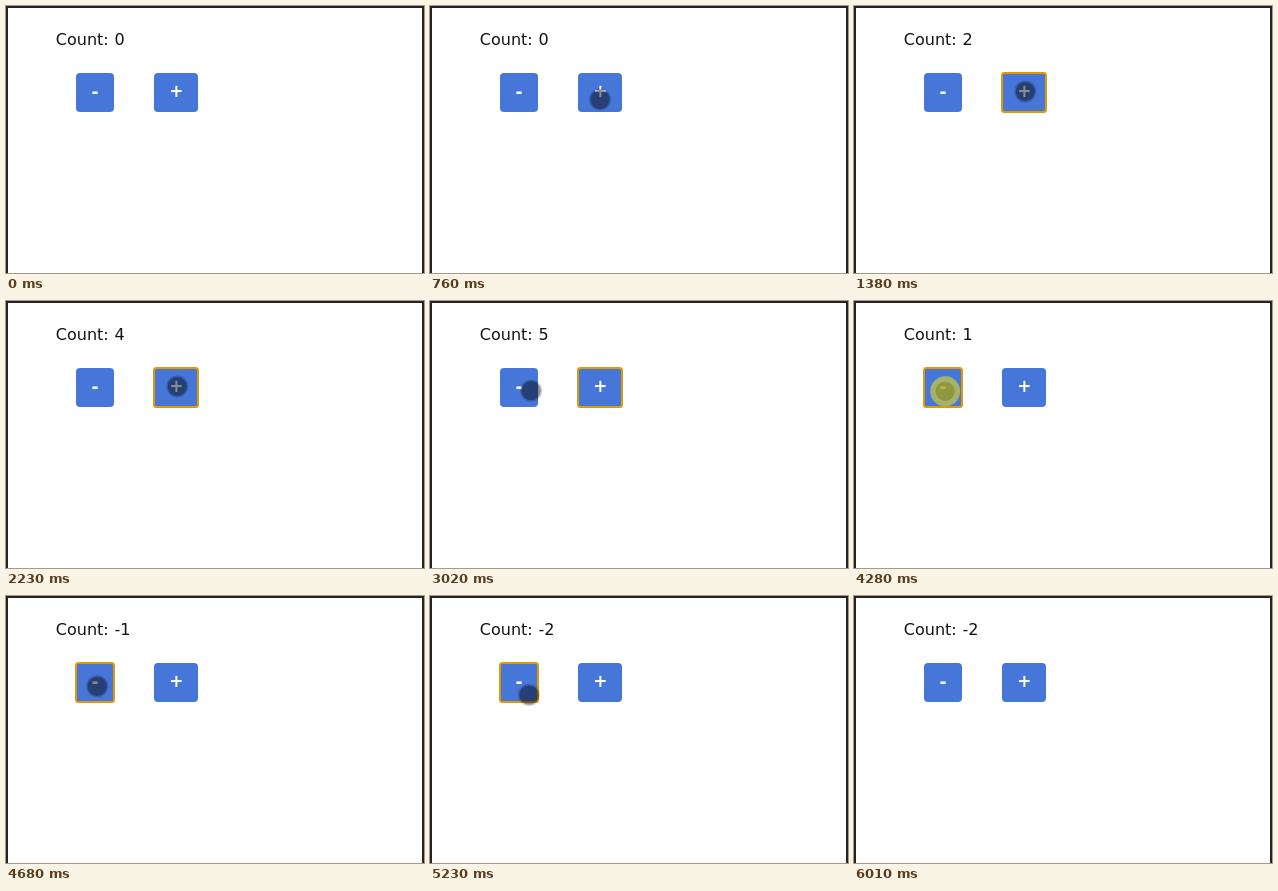
Recreate the animation shown at these times as an HTML page. Size 418x267 px, loop 6.09 s.

```html
<!DOCTYPE html>
<html lang="en">
<head>
<meta charset="utf-8">
<title>Counter</title>
<style>
  html, body { margin: 0; width: 100%; height: 100%; overflow: hidden; background: #fff; }
  svg { display: block; width: 418px; height: 267px; }
  text { font: 16px "DejaVu Sans", Verdana, sans-serif; fill: #111318; }
  .button rect { fill: #4676d8; rx: 4px; }
  .button text { font-size: 17px; font-weight: bold; fill: #fff; text-anchor: middle; }
  .focused rect { stroke: #e59700; stroke-width: 2; rx: 2.5px; }
</style>
</head>
<body>
<svg viewBox="0 0 418 267">
  <path d="M1 267V1H417V267" fill="none" stroke="#242424" stroke-width="2"/>
  <text x="49.8" y="39">Count:</text>
  <text id="count" x="108.6" y="39">0</text>
  <g id="minus" class="button">
    <rect x="70" y="67" width="38" height="39"/>
    <text x="89" y="92">-</text>
  </g>
  <g id="plus" class="button">
    <rect x="148" y="67" width="44" height="39"/>
    <text x="170.4" y="91">+</text>
  </g>
  <g id="pointer">
    <g id="idle">
      <circle r="11" fill-opacity=".2"/>
      <circle r="9.6" fill-opacity=".31"/>
    </g>
    <g id="pressed">
      <circle r="15" fill="#f0de19" fill-opacity=".57"/>
      <circle r="9.6" fill="#70790a" fill-opacity=".45"/>
    </g>
  </g>
</svg>
<script>
// Everything below is scheduled in ticks, the steps in which the picture changes.
const LOOP = 6090, START = 422, TICK = 78.45;
const HIDE = 62, BLUR = 71;
const $ = id => document.getElementById(id);

const entry = { x: 161, y: 151 };
const onPlus = { x: 171.3, y: 85.5 };
const onMinus = { x: 91.2, y: 90.3 };
const exit = { x: 99, y: 99 };

// Each button is clicked in a steady rhythm
const rhythm = (first, period, count) => Array.from({ length: count }, (_, i) => {
  const beat = first + i * period;
  return { down: Math.floor(beat), up: Math.round(beat + 1) };
});
const plusClicks = rhythm(6, 5.25, 5);
const minusClicks = rhythm(36, 3.45, 7);

const released = (clicks, tick) => clicks.filter(c => tick >= c.up).length;
const held = (clicks, tick) => clicks.some(c => tick >= c.down && tick < c.up);
const show = (id, on) => $(id).setAttribute("visibility", on ? "visible" : "hidden");

function glide(from, to, begin, end, tick) {
  const u = Math.min(1, Math.max(0, (tick - begin) / (end - begin)));
  const eased = 1 - (1 - u) ** 1.3;
  return { x: from.x + (to.x - from.x) * eased, y: from.y + (to.y - from.y) * eased };
}

function pointerAt(tick) {
  if (tick >= 61) return exit;
  return tick < 29 ? glide(entry, onPlus, 0, 5, tick) : glide(onPlus, onMinus, 29, 34, tick);
}

function render(time) {
  const tick = Math.floor((time - START) / TICK);
  $("count").textContent = released(plusClicks, tick) - released(minusClicks, tick);

  const plusFrom = plusClicks[0].down, minusFrom = minusClicks[0].down;
  $("plus").classList.toggle("focused", tick >= plusFrom && tick < minusFrom);
  $("minus").classList.toggle("focused", tick >= minusFrom && tick < BLUR);

  const visible = tick >= 0 && tick < HIDE;
  const down = held(plusClicks, tick) || held(minusClicks, tick);
  show("idle", visible && !down);
  show("pressed", visible && down);

  const { x, y } = pointerAt(tick);
  $("pointer").setAttribute("transform", `translate(${x} ${y})`);
}

const origin = performance.now();
function frame() {
  render((performance.now() - origin) % LOOP);
  requestAnimationFrame(frame);
}
frame();
</script>
</body>
</html>
```
